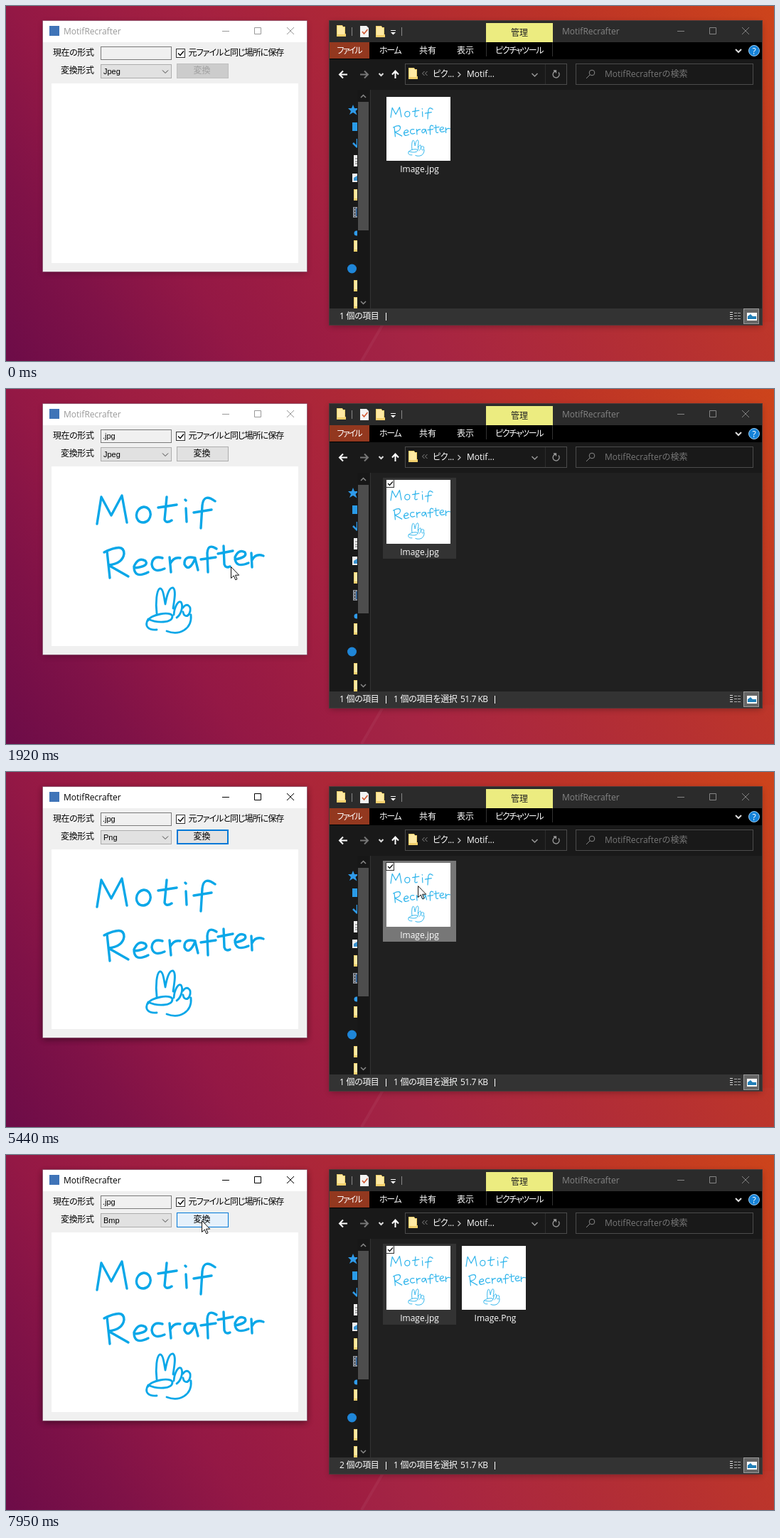
Recreate the animation shown at these times as an HTML page. Size 1080x500 px, loop 8000 ms.

```html
<!DOCTYPE html>
<html lang="ja">
<head>
<meta charset="utf-8">
<title>MotifRecrafter</title>
<style>
html, body { margin: 0; height: 100%; overflow: hidden; background: #8c1646; }
svg { display: block; width: 100vw; height: 100vh; }
text { font: 12px "Open Sans", "Noto Sans CJK JP", "Noto Sans CJK", sans-serif; white-space: pre; }
.ja { font-family: "Noto Sans CJK JP", "Noto Sans CJK", sans-serif; font-feature-settings: "palt"; letter-spacing: -.4px; }
.kanji { letter-spacing: 0; }
.kana { letter-spacing: -1.3px; }
.ui { font: 11px "Liberation Sans", sans-serif; }
.mid { text-anchor: middle; }
.end { text-anchor: end; }
.line { fill: none; stroke: currentColor; }
.cur { fill: currentColor; }
.ink { fill: none; stroke: #0aa7e8; stroke-width: 3.4; stroke-linecap: round; stroke-linejoin: round; }
.halo { fill: #000; filter: blur(5px); }

/* every state change is a hard step on the 8 s clock */
.t { animation: 8s step-end infinite; }
.h { opacity: 0; }
.form { animation-name: formTitle; color: #999; }
.expl { animation-name: explTitle; color: #858585; }
.formOn { animation-name: formOn; }
.explOn { animation-name: explOn; }
.bar { animation-name: bar; }
.drop { animation-name: drop; }
.jpeg { animation-name: jpeg; }
.png { animation-name: png; }
.bmp { animation-name: bmp; }
.list { animation-name: list; }
.mark { animation-name: mark; }
.row0 { animation-name: row0; }
.row1 { animation-name: row1; }
.row2 { animation-name: row2; }
.btn { animation-name: btn; }
.btnText { animation-name: btnText; }
.focus { animation-name: focus; }
.combo { animation-name: combo; }
.item { animation-name: item; }
.sel { animation-name: sel; }
.one { animation-name: one; }
.two { animation-name: two; }
.ghost { animation-name: ghost; }
.press { animation-name: press; }
.cursor { animation: cursor 8s linear infinite; }

@keyframes formTitle { 0% { color: #999 } 36.625% { color: #000 } 73.75% { color: #999 } 87% { color: #000 } }
@keyframes explTitle { 0% { color: #858585 } 77.25% { color: #fff } 87% { color: #858585 } }
@keyframes formOn { 0% { opacity: 0 } 36.625% { opacity: .25 } 73.75% { opacity: 0 } 87% { opacity: .25 } }
@keyframes explOn { 0% { opacity: 0 } 77.25% { opacity: .25 } 87% { opacity: 0 } }
@keyframes bar { 0% { fill: #2b2b2b } 77.25% { fill: #000 } 87% { fill: #2b2b2b } }
@keyframes drop { 0% { opacity: 0 } 24% { opacity: 1 } }
@keyframes jpeg { 0% { opacity: 1 } 46% { opacity: 0 } }
@keyframes png { 0% { opacity: 0 } 46% { opacity: 1 } 95.2% { opacity: 0 } }
@keyframes bmp { 0% { opacity: 0 } 95.2% { opacity: 1 } }
@keyframes list { 0% { opacity: 0 } 37.375% { opacity: 1 } 46% { opacity: 0 } 88.5% { opacity: 1 } 95.2% { opacity: 0 } }
@keyframes mark { 0% { transform: none } 39.7% { transform: translateY(12.8px) } 91.2% { transform: translateY(25.6px) } }
@keyframes row0 { 0% { fill: #fff } 39.7% { fill: #000 } }
@keyframes row1 { 0% { fill: #000 } 39.7% { fill: #fff } 91.2% { fill: #000 } }
@keyframes row2 { 0% { fill: #000 } 91.2% { fill: #fff } }
@keyframes btn {
  0% { fill: #ccc; stroke: #bfbfbf }
  24% { fill: #e1e1e1; stroke: #adadad }
  50.75% { fill: #e5f1fb; stroke: #0078d7 }
  54.25% { fill: #cce4f7; stroke: #005499 }
  55.875% { fill: #e5f1fb; stroke: #0078d7 }
  65% { fill: #e1e1e1; stroke: #adadad }
  98.5% { fill: #e5f1fb; stroke: #0078d7 }
}
@keyframes btnText { 0% { fill: #a0a0a0 } 24% { fill: #000 } }
@keyframes focus { 0% { opacity: 0 } 65% { opacity: 1 } 87% { opacity: 0 } }
@keyframes combo {
  0% { fill: #e1e1e1; stroke: #adadad }
  34.25% { fill: #e5f1fb; stroke: #0078d7 }
  37.375% { fill: #cce4f7; stroke: #4a7ea8 }
  48.375% { fill: #e1e1e1; stroke: #adadad }
  83.75% { fill: #e5f1fb; stroke: #0078d7 }
  88.5% { fill: #cce4f7; stroke: #4a7ea8 }
  96.5% { fill: #e1e1e1; stroke: #adadad }
}
@keyframes item { 0% { fill: #202020 } 10.6% { fill: #2d2d2d } 12.125% { fill: #333 } 67.5% { fill: #777 } 87% { fill: #333 } }
@keyframes sel { 0% { opacity: 0 } 12.125% { opacity: 1 } }
@keyframes one { 0% { opacity: 1 } 69.875% { opacity: 0 } }
@keyframes two { 0% { opacity: 0 } 69.875% { opacity: 1 } }
@keyframes ghost { 0% { opacity: 0 } 14.375% { opacity: 1 } 17.4% { opacity: 0 } }
@keyframes press {
  0% { opacity: 0 } 12.125% { opacity: .85 } 24% { opacity: 0 }
  36.625% { opacity: .85 } 37.75% { opacity: 0 }
  45.625% { opacity: .85 } 46.75% { opacity: 0 }
  54.25% { opacity: .85 } 55.875% { opacity: 0 }
  73.75% { opacity: .85 } 77.25% { opacity: 0 }
  87% { opacity: .85 } 88.25% { opacity: 0 }
  94.875% { opacity: .85 } 95.8% { opacity: 0 }
}
@keyframes cursor {
  0%, 1.6% { transform: translate(941px, 502px); animation-timing-function: ease-in-out }
  11.5%, 14.375% { transform: translate(590px, 215px) }
  15% { transform: translate(561px, 213px) }
  16.5% { transform: translate(470px, 202px) }
  18.1% { transform: translate(380px, 225px) }
  20% { transform: translate(325px, 248px) }
  21.125%, 27.1% { transform: translate(316px, 250px); animation-timing-function: ease-in-out }
  35.5%, 38.2% { transform: translate(224px, 94px); animation-timing-function: ease-in-out }
  40.9%, 46.6% { transform: translate(200px, 123px) }
  47.875% { transform: translate(215px, 109px); animation-timing-function: ease-out }
  52%, 64.125% { transform: translate(276px, 90px); animation-timing-function: ease-in-out }
  68% { transform: translate(579px, 160px) }
  69.875%, 79.1% { transform: translate(584px, 165px) }
  80.75% { transform: translate(363px, 130px); animation-timing-function: ease-out }
  85%, 89.5% { transform: translate(222px, 95px); animation-timing-function: ease-in-out }
  92%, 95.5% { transform: translate(200px, 137px); animation-timing-function: ease-in-out }
  99.375%, 100% { transform: translate(275px, 92px) }
}
</style>
</head>
<body>
<svg viewBox="0 0 1080 500" preserveAspectRatio="none">
<defs>
  <linearGradient id="sky" gradientUnits="userSpaceOnUse" x1="0" y1="500" x2="982" y2="-148">
    <stop offset="0" stop-color="#6d0c48"/><stop offset=".13" stop-color="#801247"/>
    <stop offset=".24" stop-color="#941845"/><stop offset=".43" stop-color="#a52140"/>
    <stop offset=".77" stop-color="#bb3228"/><stop offset="1" stop-color="#cd441b"/>
  </linearGradient>
  <clipPath id="nav"><rect x="456" y="118" width="38" height="308"/></clipPath>
  <g id="art" class="ink">
    <path d="M128 190L134 152L148 178L163 150L170 188M194 166c-14 2-14 22-1 22c13-1 14-21 1-22M226 152L223 184q2 6 10 1M214 167L240 163M253 168L254 187M252 156l1 1M294 158q-16-12-18 6L274 196M264 174L289 170"/>
    <path d="M142 228L146 266M138 230q28-14 28 2q-2 14-22 16L172 264M180 252q22-2 16-10q-10-6-16 8q0 18 20 8M220 238q-14-4-15 9q2 13 18 6M230 237L232 258M231 246q5-10 14-8M266 238q-16-4-15 9q6 12 15-8L270 255M296 225q-12-8-13 6L284 258M274 240L295 237M306 221L307 247q2 6 8 3M298 232L319 228M322 240q18-3 14-10q-9-5-14 7q0 16 19 8M345 231L346 251M346 241q5-10 16-6"/>
    <path stroke-width="2.8" d="M212 316C210 300 212 284 216 281C221 280 222 292 224 303C226 292 229 279 235 280C240 284 236 300 235 309M236 318C237 306 242 298 246 300C250 306 246 318 240 322M249 308C254 300 262 306 258 316C255 322 250 320 249 314M200 326C202 318 232 312 234 320C234 330 212 330 200 324C194 334 200 340 212 339M226 341C244 348 262 338 260 318"/>
  </g>
  <g id="thumb">
    <rect width="90" height="90" fill="#fff"/>
    <use href="#art" transform="translate(-39.55 -38.84) scale(.356)" opacity=".85"/>
  </g>
  <g id="folder"><path d="M0 0h8l1 2h3v10h1v4H0z" fill="#f3cf6b"/><path d="M1 1h7l1 2h2v10H1z" fill="#ffe9a3"/></g>
  <path id="down" class="line" d="M-4-2L0 2L4-2"/>
  <path id="buttons" class="line" d="M0 15.5h10M45.5 10.5h9v9h-9zM91 10l10 10M101 10l-10 10"/>
</defs>

<rect width="1080" height="500" fill="url(#sky)"/>
<path d="M535 445L502 500H1080V445z" fill="#fff" opacity=".015"/>
<path d="M535 440L500 500" stroke="#fff" stroke-width="4" opacity=".05"/>

<!-- converter window -->
<rect class="halo" x="53" y="24" width="369" height="352" opacity=".25"/>
<rect class="halo t h formOn" x="51" y="24" width="373" height="353"/>
<rect x="51.5" y="20.5" width="372" height="354" fill="#f0f0f0" stroke="#6d3050" stroke-opacity=".5"/>
<rect x="52" y="21" width="371" height="30" fill="#fff"/>
<rect x="64" y="109" width="347" height="253" fill="#fff"/>
<rect x="61" y="28" width="14" height="14" fill="#3f74b8"/>
<g class="t form">
  <text class="cur" x="81" y="40">MotifRecrafter</text>
  <use href="#buttons" x="304" y="20"/>
</g>
<text class="ja end" x="123.5" y="70">現在の形式</text>
<text class="ja end" x="123.5" y="95">変換形式</text>
<rect x="133.5" y="57.5" width="99" height="18" fill="#f0f0f0" stroke="#7a7a7a"/>
<text class="ui t h drop" x="136" y="70">.jpg</text>
<rect x="239.5" y="60.5" width="12" height="12" fill="#fff" stroke="#333"/>
<path d="M242 66.5l3 3l5-6" fill="none" stroke="#000" stroke-width="1.4"/>
<text class="ja" x="256.5" y="70" style="letter-spacing:-.95px">元ファイルと同じ場所に保存</text>
<rect class="t combo" x="133.5" y="82.5" width="99" height="19" fill="#e1e1e1" stroke="#adadad"/>
<use href="#down" x="224" y="92.5" color="#444"/>
<text class="ui t jpeg" x="137" y="96">Jpeg</text>
<text class="ui t h png" x="137" y="96">Png</text>
<text class="ui t h bmp" x="137" y="96">Bmp</text>
<rect class="t btn" x="240.5" y="81.5" width="72" height="20" fill="#ccc" stroke="#bfbfbf"/>
<rect class="t h focus" x="241" y="82" width="71" height="19" fill="none" stroke="#0078d7" stroke-width="2"/>
<text class="ja kanji mid t btnText" x="275.5" y="95">変換</text>
<use class="t h drop" href="#art"/>
<g class="t h list">
  <rect x="133.5" y="102.5" width="99" height="52" fill="#fff" stroke="#646464"/>
  <rect class="t mark" x="134" y="103" width="98" height="12.8" fill="#0078d7"/>
  <text class="ui t row0" x="136" y="113">Jpeg</text>
  <text class="ui t row1" x="136" y="125.8">Png</text>
  <text class="ui t row2" x="136" y="138.6">Bmp</text>
  <text class="ui" x="136" y="151.4">Gif</text>
</g>

<!-- file browser -->
<rect class="halo" x="456" y="24" width="606" height="427" opacity=".3"/>
<rect class="halo t h explOn" x="454" y="22" width="612" height="432"/>
<rect x="454.5" y="20.5" width="609" height="429" fill="#202020" stroke="#4a3a3a"/>
<rect class="t bar" x="455" y="21" width="608" height="30" fill="#2b2b2b"/>
<rect x="455" y="51" width="608" height="24"/>
<rect x="455" y="75" width="608" height="43" fill="#191919"/>
<rect x="455" y="118" width="57" height="308" fill="#191919"/>
<rect x="512" y="118" width="1" height="308" fill="#333"/>
<rect x="455" y="426" width="608" height="23" fill="#333"/>

<use href="#folder" x="465" y="27"/>
<path d="M486.500 30v12M556.500 30v12" stroke="#888"/>
<path d="M498 28h9l3 3v13h-12z" fill="#f4f4f4"/>
<path d="M501 36l2.500 3l5-6" fill="none" stroke="#d0542c" stroke-width="1.500"/>
<use href="#folder" x="520" y="28"/>
<path d="M541 34.500h7" stroke="#fff"/><path d="M541 37h7l-3.500 3.500z" fill="#fff"/>
<rect x="675" y="24" width="94" height="27" fill="#ecec80"/>
<text class="ja kanji mid" x="722" y="42" fill="#222">管理</text>
<g class="t expl">
  <text class="cur" x="782" y="40">MotifRecrafter</text>
  <use href="#buttons" x="944" y="20"/>
</g>

<rect x="455" y="51" width="56" height="23" fill="#93381f"/>
<path d="M675.500 51v20M768.500 51v20" stroke="#333"/>
<g fill="#fff">
  <text class="ja" x="465.500" y="67" style="letter-spacing:-1.8px">ファイル</text>
  <text class="ja kana" x="525" y="67">ホーム</text>
  <text class="ja kanji" x="581" y="67">共有</text>
  <text class="ja kanji" x="634" y="67">表示</text>
  <text class="ja kana" x="688" y="67">ピクチャ</text>
  <text class="ja kana" x="725" y="67">ツール</text>
</g>
<use href="#down" x="1030" y="63" color="#ddd" stroke-width="2"/>
<circle cx="1052" cy="63" r="7.500" fill="#1582d8" stroke="#9fd0f5"/>
<text class="mid" x="1052" y="67.500" fill="#fff" font-weight="bold">?</text>

<g fill="none" stroke-width="2">
  <path d="M480 96.500h-11M474 91.500l-5 5l5 5M547.500 102v-10M543 96.500l4.500-5l4.500 5" stroke="#fff"/>
  <path d="M498 96.500h11M504 91.500l5 5l-5 5" stroke="#777"/>
  <path d="M524.500 95l3 3l3-3" stroke="#ddd"/>
</g>
<g fill="#191919" stroke="#4b4b4b">
  <rect x="561.500" y="81.500" width="227" height="29"/>
  <rect x="801.500" y="81.500" width="249" height="29"/>
  <path d="M758.500 82v28" stroke="#2c2c2c"/>
</g>
<use href="#folder" x="566" y="87"/>
<g class="t expl"><path class="line" d="M588.500 92l-3 3l3 3M592.500 92l-3 3l3 3"/></g>
<text class="ja" x="600" y="100" fill="#fff">ピク...</text>
<path d="M635.500 93l3.500 3.500l-3.500 3.500" fill="none" stroke="#bbb" stroke-width="1.300"/>
<text x="648" y="100" fill="#fff">Motif...</text>
<use href="#down" x="743.500" y="97" color="#999" stroke-width="1.500"/>
<path d="M777 93.500a4.500 4.500 0 1 1-4-1.500M770 91h3.500v3.500" fill="none" stroke="#999" stroke-width="1.300"/>
<g fill="none" stroke="#888"><circle cx="824" cy="94" r="3.800"/><path d="M821 97l-5 5"/></g>
<text x="842" y="100" fill="#777">MotifRecrafterの検索</text>

<g clip-path="url(#nav)">
  <path d="M488 139l2 5h6l-4.500 4l2 5.500l-5.500-3.500l-5 3l2-5l-4-4h5z" fill="#2f9bea"/>
  <rect x="487" y="164" width="14" height="12" fill="#2a9be8"/>
  <path d="M494 187v12M488 193l6 6" stroke="#2f9bea" stroke-width="2.500"/>
  <rect x="489" y="210" width="12" height="16" fill="#eee"/><path d="M491 215h4M491 219h4M491 222h4" stroke="#666"/>
  <rect x="487" y="236" width="14" height="12" fill="#eee"/><path d="M489 246v-4l5-3v7z" fill="#3a92cf"/>
  <use href="#folder" x="489" y="258"/>
  <path d="M488 283h8v15h-8z" fill="#8a8f98"/><path d="M490.500 284v13" stroke="#222" stroke-dasharray="2"/><path d="M492 285h3v11h-3z" fill="#33608f"/>
  <circle cx="493" cy="320" r="3.500" fill="#2f9bea"/>
  <use href="#folder" x="489" y="330"/>
  <circle cx="486.500" cy="370" r="6.500" fill="#1f86d8"/>
  <use href="#folder" x="489" y="386"/>
  <use href="#folder" x="489" y="410"/>
</g>
<rect x="494" y="118" width="17" height="308" fill="#171717"/>
<rect x="495" y="135" width="15" height="181" fill="#4d4d4d"/>
<path d="M499 129l3.500-3.500l3.500 3.500M499 416l3.500 3.500l3.500-3.500" fill="none" stroke="#888" stroke-width="1.500"/>

<rect class="t item" x="530" y="125" width="103" height="114" fill="#202020"/>
<use href="#thumb" x="535" y="128"/>
<g class="t h sel">
  <rect x="534.500" y="127.500" width="11" height="11" fill="#fff" stroke="#333"/>
  <path d="M537 133l2.500 2.500l4.500-5" fill="none" stroke="#111" stroke-width="1.300"/>
</g>
<text class="mid" x="581.500" y="234" fill="#fff">Image.jpg</text>
<g class="t h two">
  <use href="#thumb" x="641" y="128"/>
  <text class="mid" x="688" y="234" fill="#fff">Image.Png</text>
</g>

<g fill="#fff">
  <text class="t one" x="469" y="441">1</text>
  <text class="t h two" x="469" y="441">2</text>
  <text class="ja" x="478.500" y="441">個の項目</text>
  <rect x="534" y="432" width="1" height="11"/>
  <g class="t h sel">
    <text x="545" y="441">1</text>
    <text class="ja" x="554.500" y="441">個の項目を選択</text>
    <text x="639" y="441" style="letter-spacing:-.5px">51.7 KB</text>
    <rect x="687" y="432" width="1" height="11"/>
  </g>
</g>
<path d="M1018 431.500h4M1018 434.500h4M1018 437.500h4M1018 440.500h4" stroke="#ddd"/>
<path d="M1024 432.500h10M1024 436.500h10M1024 440.500h10" stroke="#aaa" stroke-dasharray="4 1"/>
<rect x="1037.500" y="426.500" width="21" height="21" fill="#666" stroke="#999"/>
<rect x="1042" y="432" width="14" height="11" fill="#fff"/><path d="M1043 441v-4l4-3l3 3h5v4z" fill="#2380b8"/>

<!-- pointer with drag image and click highlight -->
<g class="cursor">
  <g class="t h ghost">
    <rect x="-51" y="-92" width="103" height="103" rx="3" fill="#8fb0c2" fill-opacity=".55" stroke="#a9c4d2" stroke-opacity=".5"/>
    <use href="#thumb" x="-46" y="-87" opacity=".75"/>
  </g>
  <circle class="t h press" r="12" fill="#e2e23c"/>
  <path d="M.5 .5V16.500L4.300 13L6.800 18.800L9 17.800L6.500 12.200H11.700z" fill="#fff" stroke="#111"/>
</g>
</svg>
</body>
</html>
```
